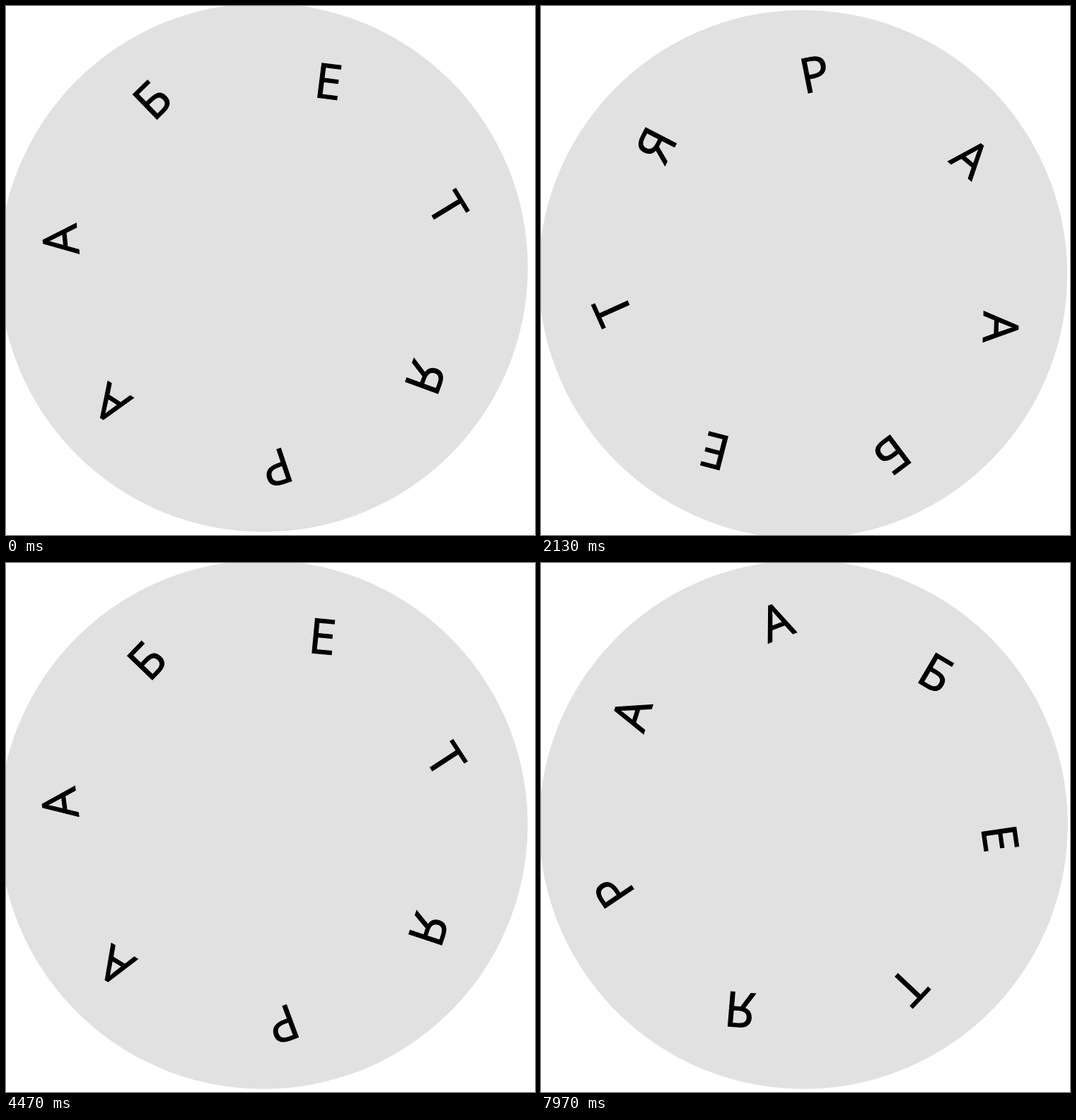
Animation, 748 px wide and 748 px high, one loop 8000 ms. Source, as an HTML page with a canvas:

```html
<!DOCTYPE html>
<html lang="ru">
<head>
<meta charset="utf-8">
<title>Letter wheel</title>
<style>
html, body { margin: 0; width: 100%; height: 100%; overflow: hidden; background: #fff; }
canvas { display: block; width: 100vmin; height: 100vmin; }
</style>
</head>
<body>
<canvas id="stage" width="748" height="748"></canvas>
<script>
const ctx = document.getElementById('stage').getContext('2d');
const SIZE = 748, LOOP = 8000, STEP = -2.7;
const RAD = Math.PI / 180;
const PIVOT = { x: 367.5, y: 374.5 };
const DISC = { x: -3.45, y: -4.65, r: 373.8 };
const FIRST_TILT = 7.2;

// Letter centres relative to the pivot, clockwise.
const LETTERS = [
  ['Е', 89.4, -267.3],
  ['Т', 257, -88],
  ['Я', 226, 148],
  ['Р', 14.1, 278.6],
  ['А', -218.4, 187.8],
  ['А', -290, -43.9],
  ['Б', -159.3, -242.6]
];

// Thirty steps a second, held for 30, 40 and 30 ms in turn.
function stepAt(ms) {
  const rest = ms % 100;
  return 3 * Math.floor(ms / 100) + (rest >= 30) + (rest >= 70);
}

function drawLetter([char, x, y], i) {
  const m = ctx.measureText(char);
  const left = (m.actualBoundingBoxLeft - m.actualBoundingBoxRight) / 2;
  const base = (m.actualBoundingBoxAscent - m.actualBoundingBoxDescent) / 2;
  ctx.save();
  ctx.translate(x, y);
  ctx.rotate((FIRST_TILT + i * 360 / LETTERS.length) * RAD);
  ctx.fillText(char, left, base);
  ctx.strokeText(char, left, base);
  ctx.restore();
}

function draw(ms) {
  ctx.fillStyle = '#fff';
  ctx.fillRect(0, 0, SIZE, SIZE);
  ctx.save();
  ctx.translate(PIVOT.x, PIVOT.y);
  ctx.rotate(stepAt(ms) * STEP * RAD);
  ctx.fillStyle = '#e1e1e1';
  ctx.beginPath();
  ctx.arc(DISC.x, DISC.y, DISC.r, 0, 2 * Math.PI);
  ctx.fill();
  ctx.fillStyle = ctx.strokeStyle = '#000';
  ctx.lineWidth = 1.2;
  ctx.miterLimit = 3;
  ctx.font = '68.5px "Open Sans", "Noto Sans", sans-serif';
  LETTERS.forEach(drawLetter);
  ctx.restore();
}

const start = performance.now();
function tick() {
  draw((performance.now() - start) % LOOP);
  requestAnimationFrame(tick);
}
draw(0);
requestAnimationFrame(tick);
</script>
</body>
</html>
```
